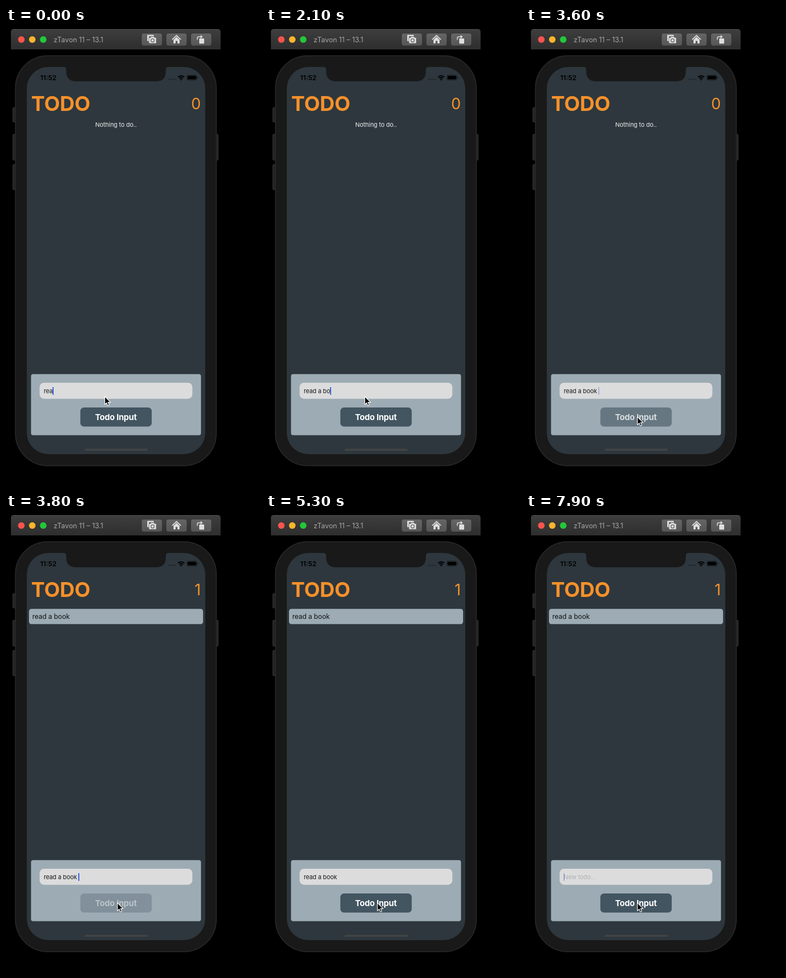
Animation of 464x834 px, one loop 8000 ms. Source, as an HTML page:

```html
<!DOCTYPE html>
<html lang="en">
<head>
<meta charset="utf-8">
<title>Todo app</title>
<style>
  html, body { margin: 0; width: 100%; height: 100%; overflow: hidden; background: #000; }
  body { position: relative; font-family: Inter, "Liberation Sans", sans-serif; }
  svg { position: absolute; left: 0; top: 0; display: block; }
  #field { position: absolute; left: 69px; top: 653.5px; height: 14px; font-size: 11px; line-height: 14px; letter-spacing: -.1px; white-space: pre; color: #17191a; }
  #field.empty #typed { position: absolute; left: 0; color: #b0b2b4; }
  #caret { position: absolute; top: .5px; width: 1.7px; height: 13.5px; margin-left: -.3px; background: #3f62d9; }
</style>
</head>
<body>
<svg width="464" height="834" viewBox="0 0 464 834">
  <defs>
    <linearGradient id="bar" x2="0" y2="1">
      <stop stop-color="#3e3e3e"/><stop offset="1" stop-color="#2e2e2e"/>
    </linearGradient>
    <linearGradient id="key" x2="0" y2="1">
      <stop stop-color="#656565"/><stop offset="1" stop-color="#565656"/>
    </linearGradient>
  </defs>

  <!-- window bar -->
  <path d="M9 39V7q0-5 5-5H387q5 0 5 5V39z" fill="url(#bar)"/>
  <path d="M13 2.5H388" stroke="#525252"/>
  <circle cx="28" cy="21" r="6" fill="#f7544d"/>
  <circle cx="48" cy="21" r="6" fill="#fab52c"/>
  <circle cx="68" cy="21" r="6" fill="#22c73a"/>
  <text x="87" y="25.8" font-size="12.7" fill="#a6a6a6">zTavon 11 – 13.1</text>
  <g fill="url(#key)">
    <rect x="248" y="10" width="37" height="22" rx="4"/>
    <rect x="293" y="10" width="37" height="22" rx="4"/>
    <rect x="338" y="10" width="37" height="22" rx="4"/>
  </g>
  <g fill="#dedede">
    <path d="M258 13.5q0-1 1-1H269q1 0 1 1V15H261V24H259q-1 0-1-1z"/>
    <path d="M261 18.5q0-1 1-1h2l1.3-1.8h5L271.600 17.500h2q1 0 1 1V27q0 1-1 1H262q-1 0-1-1z" stroke="#5d5d5d" stroke-width=".7"/>
    <circle cx="267.800" cy="22.600" r="3" fill="none" stroke="#5d5d5d" stroke-width="1.200"/>
    <path d="M311.500 12.500L320 20.600l-1.200 1.200-7.300-6.900-7.300 6.900-1.200-1.200z"/>
    <path d="M306 21.500l5.500-5.200 5.500 5.200V28h-3.800v-4.500h-3.400V28H306z"/>
    <rect x="353" y="19" width="9" height="9.500" rx="1"/>
    <path d="M349.500 21.500v-3q0-2.500 2.500-2.500h4" fill="none" stroke="#dedede" stroke-width="1.500"/>
    <path d="M355.500 12.800l4 3.200-4 3.200z"/>
  </g>

  <!-- handset -->
  <g fill="#222" stroke="#383838">
    <rect x="12.500" y="145" width="8" height="26" rx="1"/>
    <rect x="12.500" y="193.500" width="8" height="47" rx="1"/>
    <rect x="12.500" y="248.500" width="8" height="46" rx="1"/>
    <rect x="380" y="193.500" width="7.500" height="47" rx="1"/>
  </g>
  <rect x="17.200" y="50.500" width="367" height="746.500" rx="59" fill="#191919" stroke="#2b2b2b" stroke-width="1.500"/>
  <rect x="38" y="71" width="326" height="705" rx="39" fill="#2d373d"/>
  <path d="M104 70.500q6 0 6 6v2.500q0 18 18 18H274q18 0 18-18v-2.500q0-6 6-6z" fill="#191919"/>

  <!-- status bar -->
  <text x="62.500" y="95" font-size="12.400" font-weight="600">11:52</text>
  <path d="M296.500 93.500H310" stroke="#1b2226" stroke-width="1.800" stroke-dasharray="2 1.800"/>
  <g fill="none" stroke="#000" stroke-width="2">
    <path d="M314.200 89.300q5.800-4.600 11.600 0"/>
    <path d="M316.500 91.800q3.500-2.800 7 0"/>
  </g>
  <path d="M317.900 93.600q2.100-1.500 4.200 0L320 95.700z"/>
  <rect x="330.500" y="85.800" width="18" height="9" rx="2.400" fill="none" stroke="#151b1e" stroke-width=".9"/>
  <rect x="331.700" y="87" width="15.600" height="6.600" rx="1.300"/>
  <path d="M349.600 89v2.800q1-.3 1-1.400t-1-1.400z"/>

  <!-- app -->
  <g fill="#f8912a">
    <text x="46" y="151" font-size="37.500" font-weight="700" letter-spacing="-.2">TODO</text>
    <text id="count" x="356" y="147.600" font-size="28" text-anchor="end">0</text>
  </g>
  <text id="none" x="201" y="179.500" font-size="11" letter-spacing="-.07" text-anchor="middle" fill="#eef0f1">Nothing to do..</text>
  <g id="item">
    <rect x="42" y="172.700" width="318" height="27.800" rx="4.500" fill="#9dabb4"/>
    <text x="48" y="191.200" font-size="12.400" letter-spacing="-.1" fill="#111516">read a book</text>
  </g>
  <rect x="45.700" y="630.300" width="310.500" height="111.200" rx="4" fill="#9dabb4"/>
  <rect x="61.400" y="646" width="279" height="29.200" rx="8" fill="#dcdcdc"/>
  <g id="button">
    <rect x="135.800" y="691" width="130.400" height="34.700" rx="6.500" fill="#425561"/>
    <text x="200.700" y="714.200" font-size="15" font-weight="700" letter-spacing="-.2" text-anchor="middle" fill="#fff">Todo Input</text>
  </g>
  <rect x="143.500" y="766" width="115.500" height="4" rx="2" fill="#424344"/>

  <g id="menu">
    <path d="M106 612.500H152q6.500 0 6.500 6.500V633q0 6.500-6.500 6.500H136l-7 6.500-7-6.500H106q-6.500 0-6.500-6.500V619q0-6.500 6.500-6.500z" fill="#15191b"/>
    <text x="129" y="630" font-size="11" text-anchor="middle" fill="#7d878c">Paste</text>
  </g>
  <path id="mouse" d="M0 0V14.600l3.300-3.100 2.200 5.100 2.500-1.100-2.200-4.900h4.700z" stroke="#fff" stroke-width="1.100" stroke-linejoin="round"/>
</svg>
<div id="field"><span id="typed"></span><i id="caret"></i></div>

<script>
  const LOOP = 8000, STEP = 100;
  const PHRASE = "read a book ";
  // [time, characters left in the field]
  const KEYS = [
    [-100, 3], [100, 4], [600, 5], [1400, 6], [1500, 7], [1800, 8], [2000, 9],
    [2200, 10], [2500, 11], [2600, 12], [6100, 11], [6500, 10], [6600, 9],
    [6700, 8], [6800, 7], [6900, 6], [7000, 4], [7100, 3], [7200, 2], [7300, 1], [7400, 0]
  ];
  const BUTTON = [[0, 1], [3600, .6], [3700, .2], [3800, .3], [3900, .55], [4000, .8], [4100, .95], [4200, 1]];
  const MENU = [[0, 0], [6400, .5], [6500, .35], [6600, .16], [6700, 0]];

  const el = id => document.getElementById(id);
  const [count, none, item, button, menu, mouse, field, typed, caret] =
    ["count", "none", "item", "button", "menu", "mouse", "field", "typed", "caret"].map(el);

  const latest = (track, t) => track.filter(k => k[0] <= t).pop();
  const clamp = v => Math.min(1, Math.max(0, v));

  // solid for half a second after a key, then fades out and in every second
  function caretAlpha(idle) {
    if (idle < 500) return 1;
    const c = (idle - 500) % 1000;
    return c < 500 ? clamp(.8 - c / 200) : clamp((c - 400) / 300);
  }

  function draw(t) {
    const [keyTime, length] = latest(KEYS, t);
    const added = t >= 3800;
    count.textContent = added ? 1 : 0;
    none.style.display = added ? "none" : "";
    item.style.display = added ? "" : "none";

    field.className = length ? "" : "empty";
    typed.textContent = length ? PHRASE.slice(0, length) : "New todo...";
    caret.style.opacity = caretAlpha(t - keyTime);

    button.style.opacity = latest(BUTTON, t)[1];
    menu.style.opacity = latest(MENU, t)[1];

    const p = clamp((t - 2900) / 500), e = p * p * (3 - 2 * p);
    mouse.setAttribute("transform", `translate(${180.5 + 23 * e * e} ${671 + 37 * e})`);
  }

  const start = performance.now();
  function tick() {
    const t = (performance.now() - start) % LOOP;
    draw(Math.floor(t / STEP) * STEP);
    requestAnimationFrame(tick);
  }
  tick();
</script>
</body>
</html>
```
